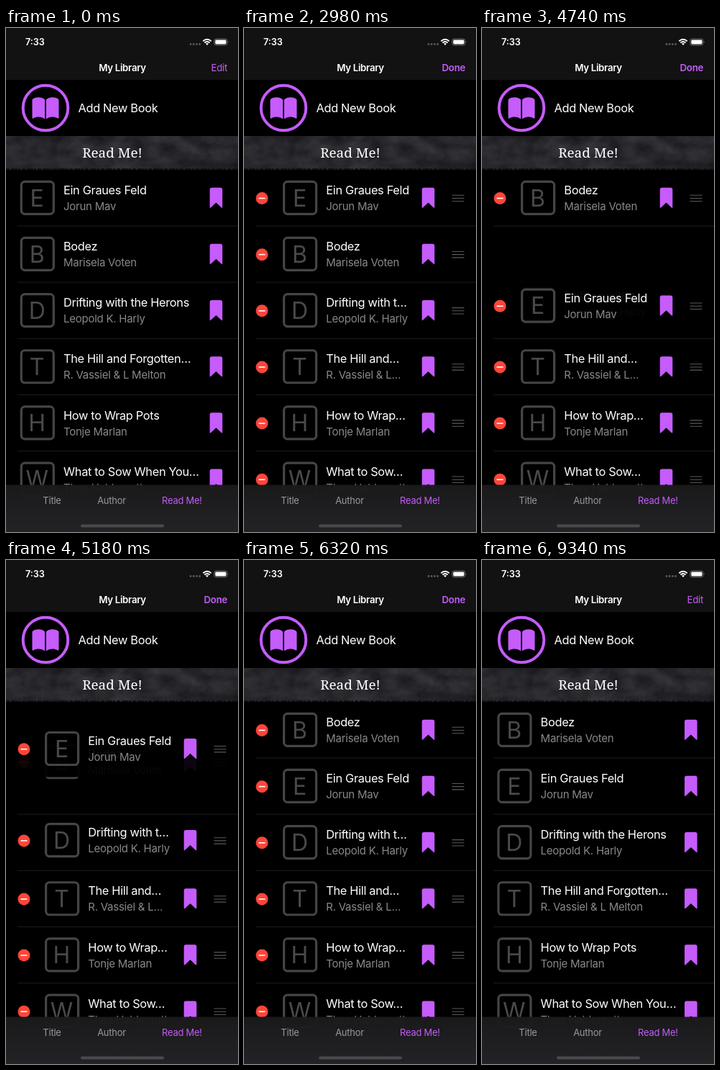
An HTML page for the animation above (9400 ms loop, 323 by 700 pixels).

```html
<!DOCTYPE html>
<html>
<head>
<meta charset="utf-8">
<style>
  html, body { margin: 0; height: 100%; background: #000; overflow: hidden; }
  svg { display: block; width: 100vw; height: 100vh; font-family: Inter, "Liberation Sans", sans-serif; }
  .title { font-size: 16.4px; letter-spacing: -.35px; fill: #fff; }
  .author { font-size: 15px; letter-spacing: -.25px; fill: #88888b; }
  .letter { font-size: 32px; fill: #4a4a4c; text-anchor: middle; }
  .bar { font-size: 13.3px; letter-spacing: -.32px; }
  .tab { font-size: 12.9px; letter-spacing: -.2px; fill: #99999c; text-anchor: middle; }
  .bold { font-weight: 600; }
  .purple { fill: #c55cfb; }
  .end { text-anchor: end; }
</style>
</head>
<body>
<svg viewBox="0 0 323 700">
  <defs>
    <filter id="slate" x="0" y="0" width="100%" height="100%" color-interpolation-filters="sRGB">
      <feTurbulence type="fractalNoise" baseFrequency=".035 .05" numOctaves="6" seed="8"/>
      <feColorMatrix values=".17 0 0 0 .075  .17 0 0 0 .07  .17 0 0 0 .09  0 0 0 0 1"/>
    </filter>
    <linearGradient id="foot" x2="0" y2="1">
      <stop stop-color="#1a1a1b"/><stop offset="1" stop-color="#242428"/>
    </linearGradient>
  </defs>
  <rect width="323" height="700"/>
  <g id="list"></g>

  <rect y="150" width="323" height="47" filter="url(#slate)"/>
  <path d="M0 196H323" stroke="#111113" stroke-width="2" stroke-dasharray="5 2 9 1 3 2"/>
  <text x="148" y="180" font-family="Noto Serif, serif" font-size="18.9" fill="#fff" text-anchor="middle">Read Me!</text>

  <circle cx="55" cy="111" r="31.3" fill="none" stroke="#c55cfb" stroke-width="4"/>
  <path class="purple" d="M54 99.5C50 95.5 42 95.5 37.5 98.5Q36.5 99 36.5 100.5V124.5Q36.5 126 38 125.5C43 122.5 50 123 54 126.5ZM56 99.5C60 95.5 68 95.5 72.5 98.5Q73.5 99 73.5 100.5V124.5Q73.5 126 72 125.5C67 122.5 60 123 56 126.5Z"/>
  <text class="title" x="100.5" y="117">Add New Book</text>

  <rect width="323" height="72" fill="#121212"/>
  <text class="bold" x="27" y="24" font-size="12.6" fill="#fff">7:33</text>
  <g fill="#5a5a5c">
    <circle cx="257" cy="22.5" r="1.4"/><circle cx="261.2" cy="22.5" r="1.4"/>
    <circle cx="265.4" cy="22.5" r="1.4"/><circle cx="269.6" cy="22.5" r="1.4"/>
  </g>
  <g fill="none" stroke="#fff" stroke-width="1.9">
    <path d="M274.3 18.2Q280 13.4 285.7 18.2M276.4 20.6Q280 17.6 283.6 20.6"/>
    <path d="M278 21.8Q280 20.4 282 21.8L280 24Z" fill="#fff" stroke="none"/>
  </g>
  <rect x="289.9" y="15.1" width="18" height="8.8" rx="2.6" fill="none" stroke="#77777a" stroke-width=".9"/>
  <rect x="291.3" y="16.5" width="15.2" height="6" rx="1.4" fill="#fff"/>
  <path d="M309 18V21Q310.4 19.5 309 18" fill="#77777a"/>
  <text class="bar bold" x="162" y="59.5" fill="#fff" text-anchor="middle">My Library</text>
  <text id="edit" class="bar purple end" x="308" y="59.5">Edit</text>
  <text id="done" class="bar bold purple end" x="308" y="59.5">Done</text>

  <rect y="634.5" width="323" height="65.5" fill="url(#foot)" opacity=".97"/>
  <text class="tab" x="64" y="661">Title</text>
  <text class="tab" x="147" y="661">Author</text>
  <text class="tab purple" x="245" y="661">Read Me!</text>
  <rect x="104" y="689.5" width="116" height="4" rx="2" fill="#4a4a4c"/>
</svg>
<script>
const LOOP = 9400, ROW = 78.15, FIRST = 236;
// title, author, then their shortened forms while editing
const books = [
  ['Ein Graues Feld', 'Jorun Mav'],
  ['Bodez', 'Marisela Voten'],
  ['Drifting with the Herons', 'Leopold K. Harly', 'Drifting with t…'],
  ['The Hill and Forgotten…', 'R. Vassiel & L Melton', 'The Hill and…', 'R. Vassiel & L…'],
  ['How to Wrap Pots', 'Tonje Marlan', 'How to Wrap…'],
  ['What to Sow When You…', 'Thea Haldenrutt', 'What to Sow…']
];
// [time, offset] pairs for the rows that move during the drag
const paths = [
  [[4310, 0], [4800, 156], [4850, 156], [5230, 20], [5290, 20], [5870, 79], [6140, ROW]],
  [[4460, 0], [4700, -ROW], [5050, -ROW], [5290, 0], [5394, 0], [5644, -ROW]],
  [[4690, 0], [4930, -ROW], [4960, -ROW], [5210, 0]]
];
const $ = id => document.getElementById(id);
const smooth = x => (x = Math.min(1, Math.max(0, x)), x * x * (3 - 2 * x));
const ramp = (t, from, to) => smooth((t - from) / (to - from));

function follow(path, t) {
  let y = path[0][1];
  for (let i = 1; i < path.length; i++) {
    const [t0, y0] = path[i - 1], [t1, y1] = path[i];
    y += (y1 - y0) * ramp(t, t0, t1);
  }
  return y;
}

const rowMarkup = ([title, author]) => `<g class="row">
  <rect class="back" y="-39" width="323" height="${ROW}" fill="#000" opacity="0"/>
  <g class="minus">
    <circle cx="-13" cy=".5" r="8.5" fill="#ff453a"/>
    <path d="M-17.5 .5h9" stroke="#fff" stroke-width="1.6"/>
  </g>
  <g class="left">
    <rect x="21.3" y="-22.7" width="45" height="45" rx="5" fill="none" stroke="#454548" stroke-width="3.2"/>
    <text class="letter" x="43.2" y="11.6">${title[0]}</text>
    <text class="title" x="80" y="-5">${title}</text>
    <text class="author" x="80" y="17">${author.replace('&', '&amp;')}</text>
  </g>
  <g class="right">
    <path class="purple" d="M283.7 -11.5Q283.7 -14.3 286.5 -14.3H298.5Q301.3 -14.3 301.3 -11.5V12.6Q301.3 14.8 299.7 13.3L292.5 6.6L285.3 13.3Q283.7 14.8 283.7 12.6Z"/>
    <path d="M325.5 -3.7h17M325.5 .5h17M325.5 4.7h17" stroke="#59595c" stroke-width="1.1"/>
  </g>
</g>`;

const lines = books.map((_, i) =>
  `<path d="M16 ${FIRST + 39 + i * ROW}H323" stroke="#1d1d1f"/>`).join('');
// the dragged row comes last so that it lies on top
$('list').innerHTML = lines + books.map(rowMarkup).reverse().join('');
const parts = ['back', 'minus', 'left', 'right', 'title', 'author'];
const rows = [...document.querySelectorAll('.row')].reverse().map(el => {
  const row = { el };
  for (const part of parts) row[part] = el.querySelector('.' + part);
  return row;
});
const move = (el, x, y) => el.setAttribute('transform', `translate(${x} ${y})`);
const fade = (el, opacity) => el.setAttribute('opacity', opacity);

function draw(t) {
  const open = ramp(t, 2665, 2975) - ramp(t, 9080, 9380);
  const short = t >= 2680 && t < 9080;
  rows.forEach((row, i) => {
    const [title, author, shortTitle = title, shortAuthor = author] = books[i];
    move(row.el, 0, FIRST + i * ROW + (paths[i] ? follow(paths[i], t) : 0));
    move(row.minus, 38 * open, 0);
    move(row.left, 34.3 * open, 0);
    move(row.right, -36 * open, 0);
    row.title.textContent = short ? shortTitle : title;
    row.author.textContent = short ? shortAuthor : author;
  });
  fade(rows[0].back, t > 4310 && t < 6140 ? .94 : 0);
  const pressed = (t >= 2480 && t < 2680) || (t >= 8880 && t < 9100);
  const dim = pressed ? .33 : 1;
  const label = smooth((open - .1) / .8);
  fade($('edit'), (1 - label) * dim);
  fade($('done'), label * dim);
}

const start = performance.now();
function tick() {
  draw((performance.now() - start) % LOOP);
  requestAnimationFrame(tick);
}
tick();
</script>
</body>
</html>
```
